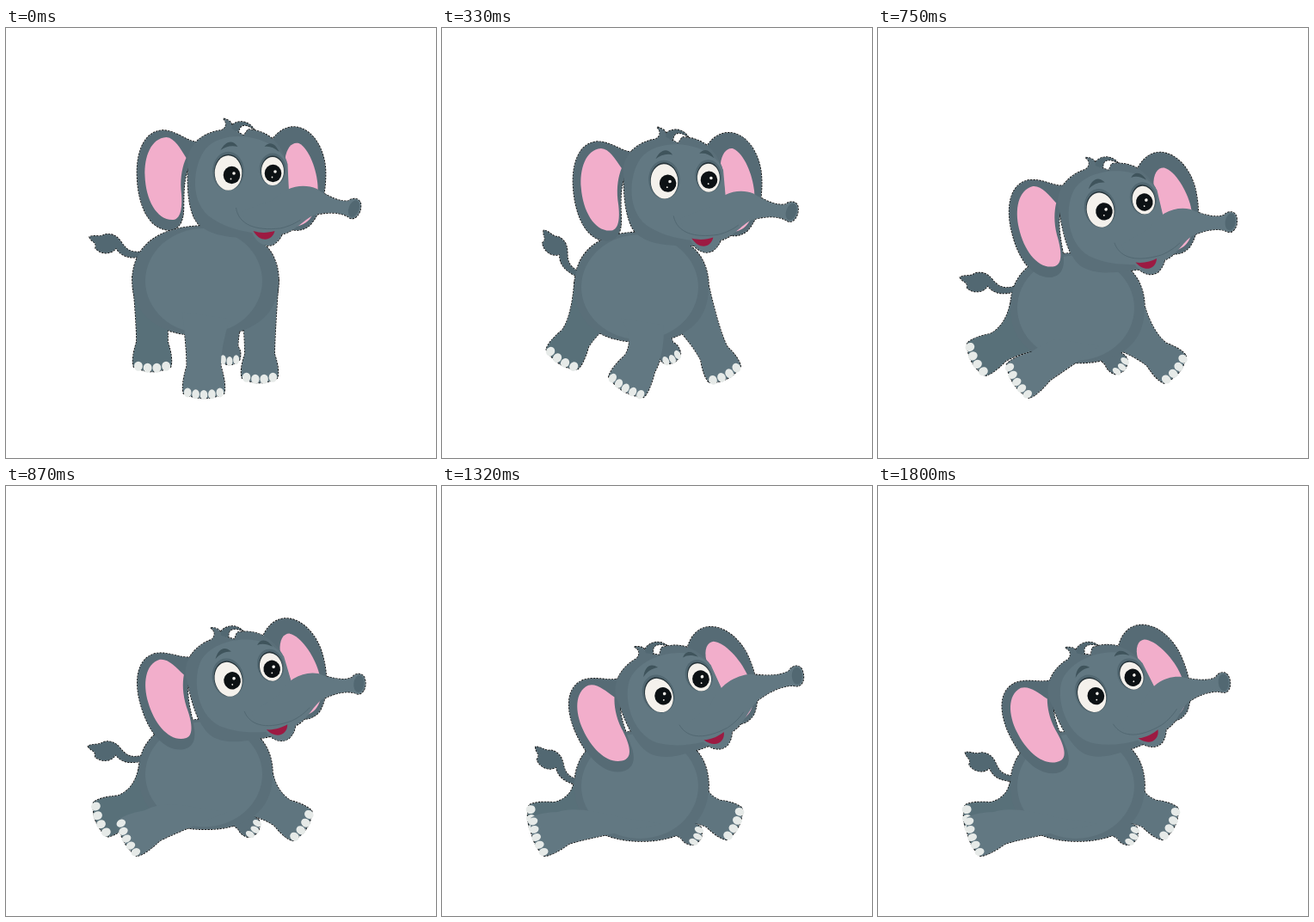
Write an HTML page with a canvas that moves like this. It is 500 px wide and 500 px high and loops after 1.83 s.

```html
<!DOCTYPE html>
<html>
<head>
<meta charset="utf-8">
<style>
html, body { margin: 0; width: 100%; height: 100%; overflow: hidden; background: #fff }
canvas { display: block; width: 100vmin; height: 100vmin }
</style>
</head>
<body>
<canvas id="stage" width="500" height="500"></canvas>
<script>
const g = stage.getContext('2d');
const LOOP = 1830, STEP = 30, LAND = 1020, REST = 1800;
const LIGHT = '#627882', MID = '#5a6f79', EAR = '#566b75', DARK = '#526872', DEEP = '#3f545c';
const PINK = '#f2aecb', WHITE = '#f4f1ec', TOE = '#e6eae8';
const { sin, cos, min, max, PI } = Math;

// hip: two joints on the body; path: start, control and end of the sole's middle; turn in degrees
const legs = {
  farHind: { hip: [247, 335, 271, 335], path: [260, 386, 268, 376, 296, 407], turn: -65, size: 23, toes: 3, fill: MID },
  hind: { hip: [154, 288, 192, 342], path: [170, 394, 115, 375, 106, 392], turn: 77, size: 43, toes: 4, fill: '#587079' },
  farFront: { hip: [272, 340, 310, 292], path: [295, 407, 362, 401, 340, 393], turn: -64, size: 41, toes: 4, fill: '#5f757f' },
  front: { hip: [207, 330, 258, 338], path: [230, 425, 222, 412, 111, 408], turn: 71, size: 47, toes: 5, fill: LIGHT }
};

const shapes = {
  tail: `M162 260C148 262 143 258 137 249C131 240 124 239 118 240C112 244 106 240 100 243
    C103 250 109 248 107 256C113 263 125 264 131 256C138 267 149 268 162 266Z`,
  earL: `M236 130C214 140 205 121 183 119C160 119 151 145 152 172C153 205 165 233 188 235
    C201 235 206 225 206 208C206 185 207 170 214 157L236 150Z`,
  pinkL: `M186 127C168 128 160 150 161 172C162 200 175 224 194 223C204 222 205 205 203 188
    C202 172 205 160 209 151C202 140 196 128 186 127Z`,
  earR: `M308 131C318 117 330 113 341 116C360 122 370 145 371 165C372 195 364 218 352 230
    C340 239 328 235 318 226Z`,
  pinkR: `M324 152C326 138 333 132 340 134C352 140 361 165 362 184C363 208 356 226 340 230
    C332 232 328 226 325 200Z`,
  head: `M211 160C208 136 230 121 250 119C256 116 257 110 252 105C262 108 263 112 262 117
    L276 125L281 118C300 119 318 130 326 155L330 225L300 245C270 244 244 244 228 232
    C212 222 210 190 211 160Z`,
  hair: 'M258 118C264 107 280 105 288 118C279 111 271 111 270 121Z',
  face: `M232 140C216 160 212 205 240 222C262 236 285 238 300 240L330 225L327 158
    C315 125 255 115 232 140Z`,
  chin: 'M284 234C289 249 300 256 310 252C318 247 322 240 322 230Z',
  mouth: 'M287 236C296 239 305 238 312 236C309 248 295 250 287 236Z',
  cheek: 'M267 209C270 229 290 236 318 233C328 231 336 227 342 223',
  brows: `M249 142C254 133 262 128 269 138C261 136 255 138 249 142Z
    M300 138C306 131 313 134 317 144C311 139 306 137 300 138Z`
};
for (const k in shapes) shapes[k] = new Path2D(shapes[k]);

const bezier = (a, b, c, u) => a * (1 - u) ** 2 + 2 * b * u * (1 - u) + c * u * u;

function moved(path, m) {
  const p = new Path2D();
  p.addPath(path, m);
  return p;
}

function oval(x, y, rx, ry, turn = 0) {
  const p = new Path2D();
  p.ellipse(x, y, rx, ry, turn, 0, 7);
  return p;
}

// A slightly boxy oval
function barrel(x, y, rx, ry) {
  const p = new Path2D(), a = rx * 0.62, b = ry * 0.66;
  p.moveTo(x, y - ry);
  for (const s of [1, -1]) {
    p.bezierCurveTo(x + s * a, y - s * ry, x + s * rx, y - s * b, x + s * rx, y);
    p.bezierCurveTo(x + s * rx, y + s * b, x + s * a, y + s * ry, x, y + s * ry);
  }
  return p;
}

// The trunk bends more the closer a point is to its tip
function trunk(dx, dy) {
  const bend = (x, y) => {
    const w = min(1, max(0, (x - 318) / 82));
    return [x + dx * w, y + dy * w];
  };
  const p = new Path2D();
  const curve = (a, b, c, d, x, y) => p.bezierCurveTo(...bend(a, b), ...bend(c, d), ...bend(x, y));
  p.moveTo(310, 200);
  curve(325, 184, 345, 180, 361, 187);
  curve(374, 196, 388, 203, 398, 201);
  curve(404, 196, 413, 199, 412, 207);
  curve(412, 217, 404, 225, 398, 220);
  curve(388, 213, 370, 214, 357, 218);
  curve(345, 223, 335, 238, 318, 240);
  curve(295, 242, 275, 232, 275, 212);
  p.closePath();
  return [p, oval(...bend(404, 210), 6, 10, 0.35)];
}

function makeLeg({ hip, path, turn, size, toes, fill }, u, dy, widen) {
  const [x0, y0, x1, y1, x2, y2] = path;
  const cx = bezier(x0, x1, x2, u), cy = bezier(y0, y1, y2, u);
  const angle = turn * PI / 180 * u ** 0.75;
  // point at a along the sole from its middle, up away from the ground
  const at = (a, up) => [cx + cos(angle) * a + sin(angle) * up, cy + sin(angle) * a - cos(angle) * up];
  const joint = (x, y) => [232 + (x - 232) * widen, y + dy];
  const half = size / 2, ankle = size * 0.42, h = size * 0.68;
  const p = new Path2D();
  p.moveTo(...joint(hip[0], hip[1]));
  p.quadraticCurveTo(...at(-ankle, h * 1.7), ...at(-ankle, h));
  p.quadraticCurveTo(...at(-half - 3, 9), ...at(-half, 0));
  p.quadraticCurveTo(...at(0, -11), ...at(half, 0));
  p.quadraticCurveTo(...at(half + 3, 9), ...at(ankle, h));
  p.quadraticCurveTo(...at(ankle, h * 1.7), ...joint(hip[2], hip[3]));
  p.closePath();
  const nails = new Path2D();
  for (let i = 0; i < toes; i++) {
    const f = (i + 0.5) / toes;
    nails.addPath(oval(...at((f - 0.5) * size, 2.5 - 16 * f * (1 - f)), size / toes * 0.46, 5.5, angle));
  }
  return [[p, fill, 1], [nails, TOE]];
}

function draw(t) {
  const u = min(1, t / LAND), drop = u ** 1.8;               // sinking into the crouch
  const late = max(0, (t - LAND) / (REST - LAND));           // then leaning back
  const lean = 1 - (1 - late) ** 2, reach = sin(PI * late);
  const swing = 1 - cos(2 * PI * t / 800);                   // tail wag
  const bodyY = 294 + 55 * drop, bodyW = 85 - 7 * min(1, t / 330);

  const head = new DOMMatrix().translate(258.5 - 10 * lean, 168 + 75 * drop)
    .rotate(-18.5 * drop - 5.5 * lean).translate(-258, -168);
  const tail = new DOMMatrix().translate(157, 263 + 70 * drop + 7 * swing)
    .rotate(20 * swing - 10 * u).translate(-160, -263);
  const onHead = (path, fill, edge) => [moved(path, head), fill, edge];
  const leg = name => makeLeg(legs[name], u, bodyY - 294, bodyW / 78);
  const [trunkPath, nose] = trunk(12 * reach, 7 * late * late - 4 * reach);

  // [path, fill, has outline], back to front
  const parts = [
    [moved(shapes.tail, tail), DARK, 1],
    onHead(shapes.earR, EAR, 1),
    onHead(shapes.pinkR, PINK),
    ...leg('farHind'), ...leg('hind'), ...leg('farFront'),
    [barrel(232, bodyY, bodyW, 64), MID, 1],
    [oval(230, bodyY, 68, 61), LIGHT],
    ...leg('front'),
    onHead(shapes.earL, EAR, 1),
    onHead(shapes.pinkL, PINK),
    onHead(shapes.hair, DARK, 1),
    onHead(shapes.head, MID, 1),
    onHead(shapes.face, LIGHT),
    onHead(shapes.chin, LIGHT, 1),
    onHead(trunkPath, LIGHT, 1),
    onHead(nose, DARK),
    onHead(shapes.mouth, '#9c1a42'),
    onHead(shapes.brows, DEEP)
  ];
  const eye = (x, y, rx, ry, px, py) => parts.push(
    onHead(oval(x, y - 2, rx + 2.5, ry + 2.5), DARK),
    onHead(oval(x, y - 0.8, rx + 0.6, ry + 0.8), '#26343a'),
    onHead(oval(x, y, rx, ry), WHITE),
    onHead(oval(px, py, 9.8, 10.2), '#0c1114'),
    onHead(oval(px + 2.5, py - 2, 1.8, 1.8), WHITE),
    onHead(oval(px - 1, py + 4.5, 0.9, 0.9), WHITE));
  eye(258, 168.5, 15.8, 20.2, 262, 171);
  eye(309.5, 166.5, 13, 16.5, 310, 169);

  g.fillStyle = '#fff';
  g.fillRect(0, 0, 500, 500);
  g.lineJoin = 'round';
  g.lineWidth = 1.5;
  g.strokeStyle = '#111';
  g.setLineDash([2.5, 1]);
  for (const [path, , edge] of parts) if (edge) g.stroke(path);
  g.setLineDash([]);
  for (const [path, fill] of parts) {
    g.fillStyle = fill;
    g.fill(path);
  }
  g.lineWidth = 1;
  g.strokeStyle = DARK;
  g.stroke(moved(shapes.cheek, head));
}

const start = performance.now();
function tick() {
  const t = (performance.now() - start) % LOOP;
  draw(Math.floor(t / STEP) * STEP);
  requestAnimationFrame(tick);
}
tick();
</script>
</body>
</html>
```
